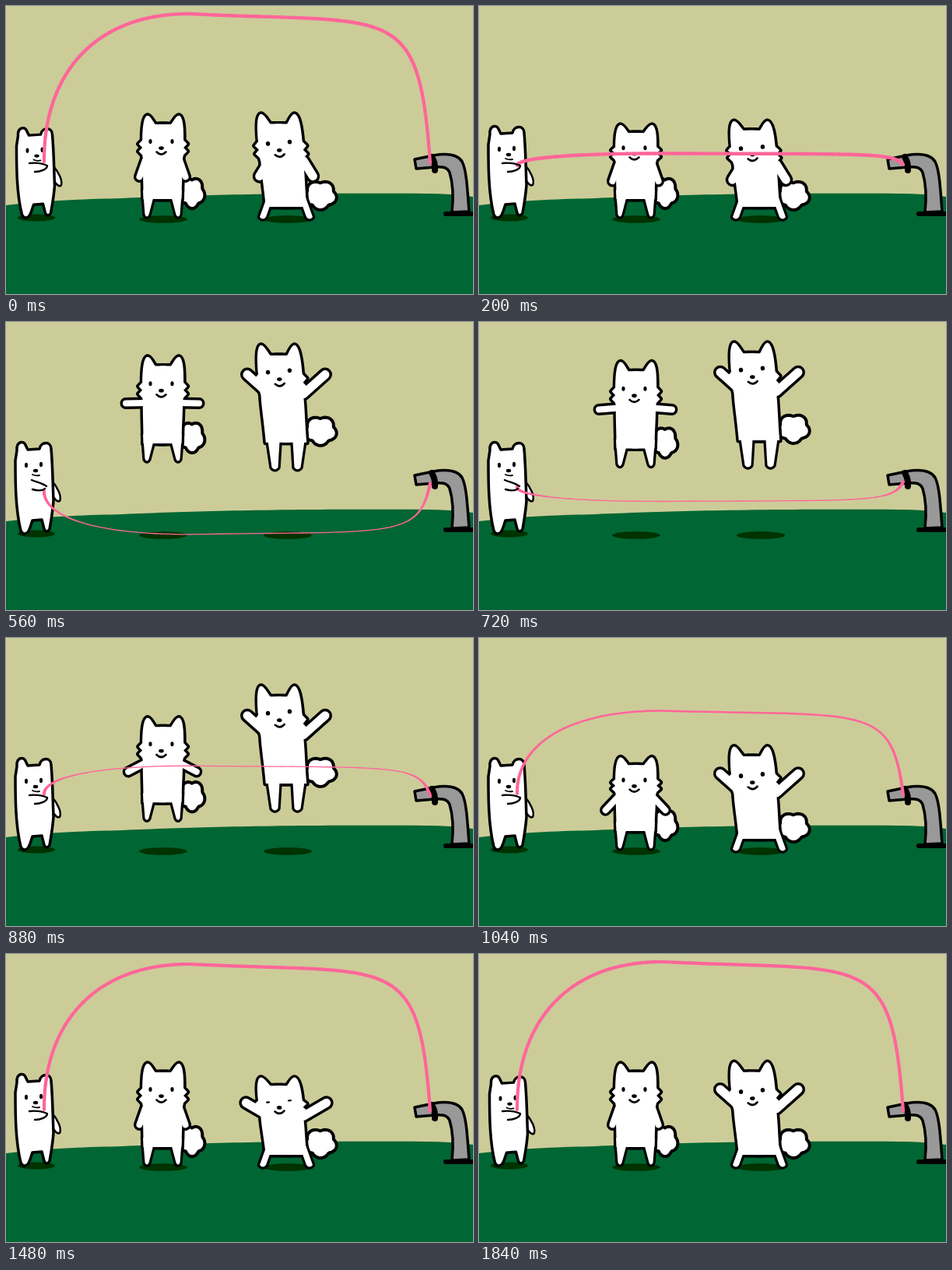
Write an HTML page with a canvas that moves like this. It is 600 px wide and 370 px high and loops after 1880 ms.

```html
<!DOCTYPE html>
<html>
<head>
<meta charset="utf-8">
<style>
html, body { margin: 0; width: 100%; height: 100%; overflow: hidden; background: #cc9; }
canvas { display: block; }
</style>
</head>
<body>
<canvas id="stage" width="600" height="370"></canvas>
<script>
const c = document.getElementById('stage').getContext('2d');
const LOOP = 1880, STEP = 40;
const clamp = v => Math.max(0, Math.min(1, v));
const mix = (a, b, k) => a + (b - a) * k;
const part = (t, from, to) => clamp((t - from) / (to - from));
const smooth = u => u * u * (3 - 2 * u);
const smoother = u => u ** 3 * (u * (6 * u - 15) + 10);
const bump = (t, mid, width) => Math.exp(-(((t - mid) / width) ** 2));

function shape(d, fill, line, width = 3.5) {
  const p = new Path2D(d);
  if (fill) { c.fillStyle = fill; c.fill(p); }
  if (line) { c.strokeStyle = line; c.lineWidth = width; c.stroke(p); }
}

function oval(x, y, rx, ry, color = '#000') {
  c.fillStyle = color;
  c.beginPath();
  c.ellipse(x, y, rx, ry, 0, 0, 7);
  c.fill();
}

function scenery() {
  shape('M0 0H600V370H0Z', '#cc9');
  shape('M0 256C60 249 110 248 150 247C240 243 350 240 540 241Q570 241 600 245V370H0Z', '#063');
  oval(39, 272, 24, 4.5, '#030');
  oval(202, 274, 31, 4.8, '#030');
  oval(362, 274, 31, 5, '#030');
  shape('M565 267H600', null, '#000', 6);
  shape('M525 197L549 192C566 189 580 190 586 200C592 211 593 240 595 264L573 265C575 246 574 227 570 214C567 207 561 206 551 207L527 209Z', '#999', '#000');
  shape('M547 194Q552 202 551 211', null, '#000', 8);
}

// Pairs in a leg are [standing, jumping]; half widths count from x.
const foxes = [
  {
    x: 201, lean: 1, wide: 1, floor: 272, size: 109, stretch: 4, dip: 20,
    jump: { mid: 615, half: 339, height: 94.5 }, land: [990, 75],
    leg: { length: [24, 24], inner: [12, 12], foot: [20, 20], sole: 2.5 },
    tail: [38, -8, 15, 18], face: [199.5, 0, 0], eye: [2.1, 3],
    shoulder: .46, armWidth: 8,
    arm: (t, high, land) => 78 * (1 - high ** .65) - 40 * land
  },
  {
    x: 360, lean: -11, wide: 1.07, floor: 275, size: 121, stretch: 6, dip: 22,
    jump: { mid: 652, half: 350, height: 90.5 }, land: [1420, 200],
    leg: { length: [17, 36], inner: [21, 8.5], foot: [30, 14.5], sole: 4 },
    tail: [44, -15, 19, 17], face: [350.5, -.08, 5], eye: [2.7, 2.9],
    shoulder: .49, armWidth: 11,
    arm: (t, high, land) => mix(65, -45, smooth(part(t, 240, 480))) + 13 * land
  }
];

// One side of head and torso: hip, cheek tufts, ear, back to the middle.
function halfBody(f, side, top, len) {
  const p = (x, y) => `${f.x + f.lean * (1 - y) + side * x * f.wide} ${top + y * len} `;
  let tufts = '';
  for (let i = 0; i < 5; i++) tufts += 'L' + p(i % 2 ? 31 : 26.5, .48 - i * .043);
  return 'M' + p(-4, 1) + 'L' + p(24.5, 1) + 'C' + p(24.5, .8) + p(26, .65) + p(25.5, .52) + tufts +
    'C' + p(26.5, .2) + p(26, .02) + p(20, .015) + 'C' + p(16, .02) + p(13, .09) + p(10, .12) +
    'L' + p(-4, .12) + 'Z';
}

function drawTail(x, y, rx, ry) {
  let d = '';
  for (let a = 0; a < 6.28; a += .1) {
    const r = .92 + .2 * Math.abs(Math.sin(a * 2.5 + .8));
    d += (d ? 'L' : 'M') + (x + rx * r * Math.cos(a)) + ' ' + (y + ry * r * Math.sin(a));
  }
  shape(d + 'Z', '#fff', '#000', 4);
}

function drawFace(f, top, len, air, shut) {
  const [x, tilt, lookUp] = f.face, [rx, ry] = f.eye;
  c.save();
  c.translate(x, top + len * .32 - lookUp * air);
  c.rotate(tilt);
  for (const side of [-1, 1]) oval(side * 14, 0, rx, shut ? 1.2 : ry);
  oval(0, len * .08, 3.3, 2.4);
  c.translate(0, len * .125);
  shape('M-6 0Q0 6 6 0', null, '#000', 2.6);
  c.restore();
}

function drawFox(f, t) {
  const { mid, half, height } = f.jump;
  const high = Math.max(0, 1 - ((t - mid) / half) ** 2), lift = high * height;
  const air = clamp(lift / 40), land = bump(t, ...f.land);
  const crouch = bump(t, mid - half, 110) + land;
  const len = f.size + f.stretch * air - f.dip * crouch;
  const [leg, inner, foot] = [f.leg.length, f.leg.inner, f.leg.foot].map(v => mix(...v, air));
  const hip = f.floor - lift - leg, top = hip - len, sole = f.leg.sole;
  const angle = f.arm(t, high, land) * Math.PI / 180;
  const reach = 22 + Math.max(0, -angle) * 17;
  const shoulderY = hip - len * f.shoulder;

  const [tx, ty, rx, ry] = f.tail;
  drawTail(f.x + tx, hip + ty, rx, ry);

  // Black silhouettes first, then white insides, so the parts merge.
  for (const color of ['#000', '#fff']) {
    const line = color === '#000' && color;
    for (const side of [-1, 1]) {
      const x = v => f.x + side * v;
      shape(halfBody(f, side, top, len), color, line, 7);
      shape(`M${x(25)} ${hip - 12}L${x(foot + sole)} ${hip + leg - 4}Q${x(foot)} ${hip + leg + 1} ${x(foot - sole)} ${hip + leg - 4}L${x(inner)} ${hip - 1}Z`, color, line, 6.5);
      shape(`M${x(22)} ${shoulderY}L${x(25 + Math.cos(angle) * reach)} ${shoulderY + Math.sin(angle) * reach}`,
        null, color, f.armWidth + (line ? 7 : 0));
    }
  }
  drawFace(f, top, len, air, land > .7);
}

function drawBear(low) {
  c.save();
  if (low) {
    c.translate(1.5, 5.4);
    c.scale(1, .98);
  }
  shape('M59 204C66 212 72 224 69 230C65 232 62 226 59 222', '#fff', '#000', 2.5);
  shape('M14 165C13 153 23 152 25 158L28 164L43 163C45 153 58 153 58 163C60 185 60 205 61 230C60 243 58 255 56 266Q52 272 49 266L46 254L34 255C32 260 31 266 28 270Q22 275 19 268C12 240 12 205 12 178Z', '#fff', '#000');
  oval(26, 184, 2, 3.2);
  oval(45, 183, 2, 3.2);
  oval(38, 191, 3.2, 2.2);
  shape('M34 196Q38 198 43 197', null, '#000', 1.8);
  c.restore();
}

function drawHand(peak) {
  shape(peak > 210
    ? 'M33 203C40 206 47 207 52 211M34 215C40 217 47 217 50 214'
    : 'M30 202C38 201 46 202 53 205C53 210 44 213 37 213', null, '#000', 2.4);
}

// Whips down in front, then swings slowly up behind.
function ropePeak(t) {
  if (t < 270) return mix(10, 337, part(t, 0, 270) ** 2);
  if (t < 350) return mix(337, 286, part(t, 270, 350));
  return mix(286, 13, smoother(part(t, 350, 1475))) - 3 * part(t, 1680, 1760);
}

const bezier = (a, b, d, e, u) => {
  const v = 1 - u;
  return v * v * v * a + 3 * v * v * u * b + 3 * v * u * u * d + u * u * u * e;
};

function drawRope(t, peak) {
  const far = 1.3 + 2.9 * clamp((150 - peak) / 137);
  const mid = mix(4.4, far, part(t, 240, 360));
  const drop = part(peak, 160, 260);
  // Each half: x, then the share of the way from its end to the peak.
  const halves = [
    [200 + 17 * drop, [49, 48, 110, 235], [0, .57, 1, 1]],
    [202 + 5 * drop, [235, 500, 530, 545], [1, .93, 1.1, 0]]
  ];
  c.strokeStyle = '#f69';
  for (const [end, xs, shares] of halves) {
    let last;
    for (let i = 0; i <= 40; i++) {
      const share = bezier(...shares, i / 40);
      const point = [bezier(...xs, i / 40), mix(end, peak, share)];
      if (last) {
        c.lineWidth = mix(4.2, mid, clamp(share * 1.25));
        c.beginPath();
        c.moveTo(...last);
        c.lineTo(...point);
        c.stroke();
      }
      last = point;
    }
  }
}

function draw(t) {
  const peak = ropePeak(t);
  c.lineCap = c.lineJoin = 'round';
  scenery();
  drawBear(t < 120 || t >= 1720);
  foxes.forEach(f => drawFox(f, t));
  drawRope(t, peak);
  drawHand(peak);
}

const start = performance.now();
function frame() {
  const t = (performance.now() - start) % LOOP;
  draw(Math.floor(t / STEP) * STEP);
  requestAnimationFrame(frame);
}
frame();
</script>
</body>
</html>
```
